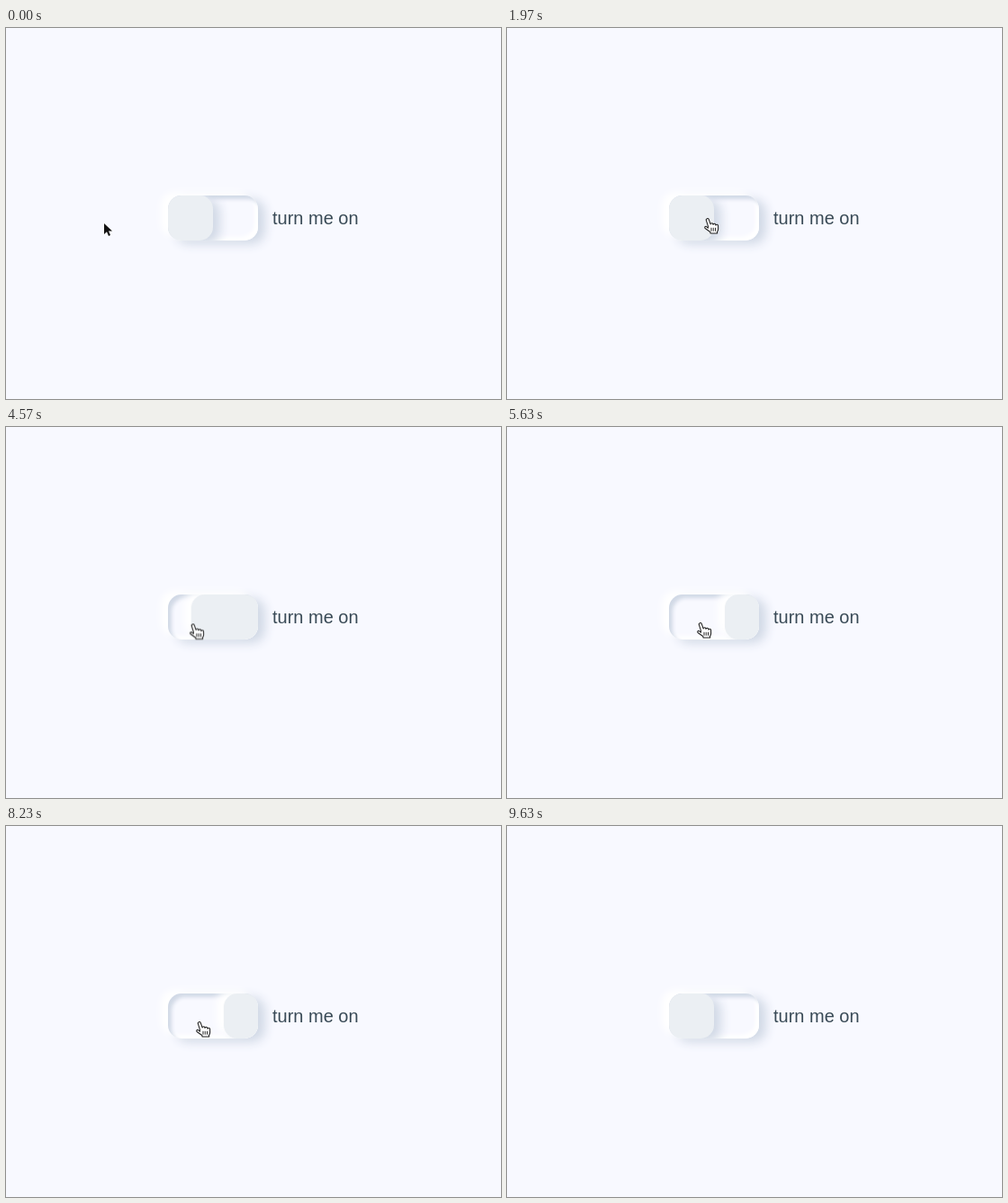
An HTML page that plays this animation: 550 px wide and 412 px high, repeating every 9.66 s.

```html
<!DOCTYPE html>
<html lang="en">
<head>
<meta charset="utf-8">
<title>Soft toggle</title>
<style>
  :root { --loop: 9.66s; --ground: #f8f9ff; --shade: #d1d9e6; }
  html, body { margin: 0; width: 100%; height: 100%; overflow: hidden; background: var(--ground); }
  .stage { position: relative; width: 550px; height: 412px; overflow: hidden; background: var(--ground); }
  .stage * { position: absolute; }

  .toggle {
    left: 180px; top: 186px; width: 100px; height: 50px; border-radius: 15px; overflow: hidden;
    box-shadow: -8px -4px 8px #fff, 8px 4px 12px var(--shade),
      inset 4px 4px 4px var(--shade), inset -4px -4px 4px #fff;
  }
  /* Twice as wide as the track, so it fills the track while it slides across. */
  .slider {
    left: 0; top: 0; width: 200px; height: 50px; border-radius: 15px; background: #ebeff3;
    box-shadow: -8px -4px 8px #fff, 8px 4px 12px var(--shade);
    animation: flip var(--loop) cubic-bezier(.85, .05, .18, 1.35) infinite;
  }
  .label {
    left: 296px; top: 200px; color: #394a56; white-space: nowrap;
    font: 20px/23px "Liberation Sans", Arial, sans-serif;
  }

  .pointer { left: 0; top: 0; animation: roam var(--loop) linear infinite; }
  .pointer svg { left: 0; top: 0; width: 1px; height: 1px; overflow: visible; }
  .arrow { animation: arrow var(--loop) step-end infinite; }
  .hand { animation: hand var(--loop) step-end infinite; }

  @keyframes flip {
    0%, 24.95%, 51.55%, 53.62%, 72.46%, 80.33%, 96.79%, 100% { transform: translateX(-150px); }
    31.16%, 45.34%, 59.83%, 66.25%, 86.54%, 90.58% { transform: translateX(50px); }
  }
  @keyframes roam {
    0%, .3% { transform: translate(109px, 217px); }
    1.55% { transform: translate(40px, 225px); }
    2.9% { transform: translate(17px, 190px); }
    4.66% { transform: translate(150px, 130px); }
    6.21% { transform: translate(300px, 120px); }
    7.87% { transform: translate(438px, 170px); }
    9.01% { transform: translate(400px, 240px); }
    10.04% { transform: translate(310px, 258px); }
    11.7% { transform: translate(170px, 355px); }
    13.46% { transform: translate(30px, 340px); }
    14.7% { transform: translate(2px, 270px); }
    16.36% { transform: translate(60px, 175px); }
    17.81% { transform: translate(200px, 153px); }
    19.15% { transform: translate(340px, 165px); }
    19.98% { transform: translate(328px, 212px); }
    20.39%, 20.65% { transform: translate(223px, 211px); }
    21.01%, 25.16% { transform: translate(209px, 211px); }
    31.06% { transform: translate(215px, 214px); }
    35.5%, 35.9% { transform: translate(239px, 212px); }
    36.85% { transform: translate(320px, 230px); }
    38.3% { transform: translate(380px, 290px); }
    39.86% { transform: translate(260px, 330px); }
    41.41% { transform: translate(110px, 310px); }
    42.24% { transform: translate(92px, 270px); }
    44% { transform: translate(190px, 225px); }
    44.82% { transform: translate(205px, 219px); }
    53.62%, 58.7% { transform: translate(215px, 217px); }
    65.22% { transform: translate(255px, 214px); }
    68.84% { transform: translate(288px, 216px); }
    73.81%, 75.57% { transform: translate(257px, 213px); }
    78.99%, 85.61% { transform: translate(215px, 217px); }
    89.54%, 90.68% { transform: translate(376px, 212px); }
    93.17% { transform: translate(430px, 120px); }
    96.27% { transform: translate(520px, 40px); }
    98.34%, 100% { transform: translate(556px, 9px); }
  }
  @keyframes arrow {
    0%, 36.3%, 91% { visibility: visible; }
    20.3%, 43.9% { visibility: hidden; }
    100% { visibility: visible; }
  }
  @keyframes hand {
    0%, 36.3%, 91% { visibility: hidden; }
    20.3%, 43.9% { visibility: visible; }
    100% { visibility: hidden; }
  }
</style>
</head>
<body>
<div class="stage">
  <div class="toggle"><div class="slider"></div></div>
  <div class="label">turn me on</div>
  <div class="pointer">
    <svg class="arrow">
      <path d="M0 0V12L3 9.3L5 14L7 13.1L5 8.6H9Z" fill="#111" stroke="#fff" paint-order="stroke"/>
    </svg>
    <svg class="hand">
      <g stroke="#222" transform="scale(1.08)">
        <path d="M.4 8.5L-1.5 2.4a1.4 1.4 0 0 1 2.7-.9L2.9 6.4a1.3 1.3 0 0 1 2.5-.2l.2.6a1.3 1.3 0 0 1 2.5 0l.2.7a1.25 1.25 0 0 1 2.4.3l.1 3.2q0 2-1.1 3.2l.2 1.6H2.9l-.3-1.4L-2.6 10.6q-.9-1.2.2-1.9q.9-.4 1.6.6l1.2 1Z" fill="#fff" stroke-linejoin="round"/>
        <path d="M3.7 10v3.6M5.8 10v3.6M7.9 10v3.6" stroke-width=".9"/>
      </g>
    </svg>
  </div>
</div>
</body>
</html>
```
